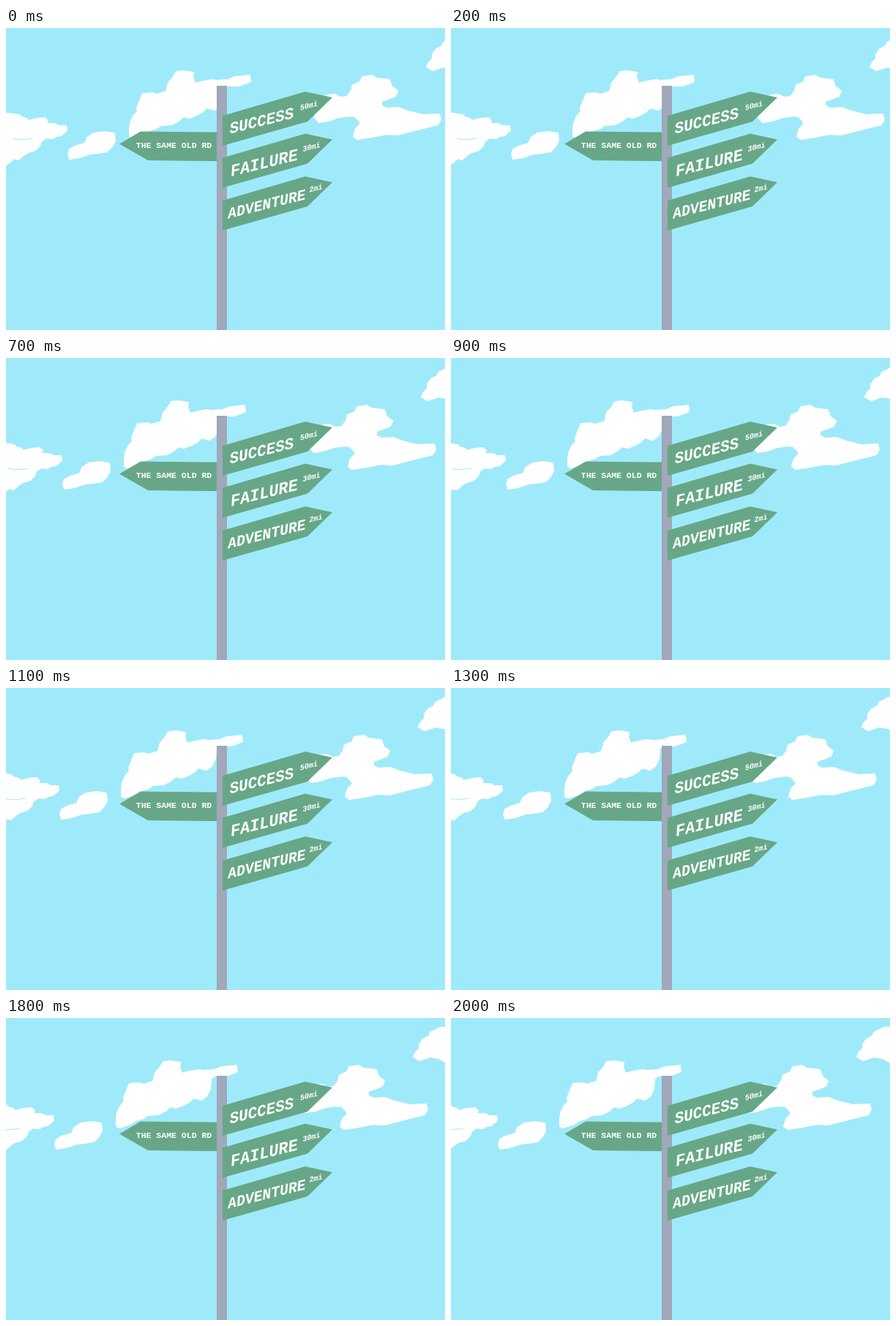
These frames come from a looping animation (600x413 px, 2100 ms). An HTML page:

```html
<!DOCTYPE html>
<html lang="en">
<head>
<meta charset="utf-8">
<title>Signpost</title>
<style>
  html, body { margin: 0; width: 100%; height: 100%; overflow: hidden; background: #9feafa; }
  svg { display: block; width: 600px; height: 413px; }
  text { font: bold 11.5px "Liberation Mono", "DejaVu Sans Mono", monospace; fill: #fff; text-anchor: middle; }
</style>
</head>
<body>
<svg viewBox="0 0 600 413">
  <rect width="600" height="413" fill="#9feafa"/>
  <g id="clouds" fill="#fff" stroke="#fff" stroke-width="2" stroke-linejoin="round">
    <path d="M-5 117 6 117 18 119 21 122 28 124 30 127 42 124 53 123 57 127 54 131 66 131 72 134 82 134 83 140 75 147 68 148 64 151 55 150 48 155 46 161 40 167 30 170 24 174 17 180 11 178 6 183 0 187 -5 188Z"/>
    <path d="M85 173 87 166 94 162 108 158 111 150 120 144 135 142 148 144 149 154 145 162 138 169 125 171 115 172 100 177 87 179Z"/>
    <path d="M169 148 169 138 170 130 174 121 180 114 179 109 183 99 187 90 200 89 206 91 219 87 222 75 229 67 233 60 243 59 256 61 255 67 257 72 258 76 270 73 282 71 288 72 303 71 313 67 333 65 334 73 327 76 318 79 303 79 298 83 297 97 292 107 285 112 274 109 268 115 261 119 250 123 243 121 236 127 226 132 212 133 206 137 196 140 188 145 173 150Z"/>
    <path d="M426 98 440 92 450 91 457 95 466 94 472 86 474 78 484 74 487 67 500 65 507 69 524 71 527 80 535 86 532 93 522 97 513 100 513 106 520 110 536 109 549 114 570 119 592 118 594 125 590 132 570 137 550 142 535 146 520 145 500 149 480 152 475 148 478 138 485 131 482 126 477 121 470 120 455 122 440 127 428 129 422 122Z"/>
    <path d="M575 53 578 47 583 42 583 36 588 29 596 25 598 20 604 17 611 13 624 13 624 61 618 60 610 55 598 53 583 58Z"/>
    <path d="M10 151 19 153 28 152 37 151" fill="none" stroke="#9feafa" stroke-width="1"/>
  </g>
  <path d="M288 79h14v334h-14z" fill="#a0a8b9"/>
  <path d="M155 158.500 184 141.500 288 142.500V182L194 181Z" fill="#67a787"/>
  <g id="signs" fill="#67a787"></g>
  <g id="labels"></g>
</svg>
<script>
const get = id => document.getElementById(id);

get("signs").innerHTML = [120, 177.5, 236].map(y =>
  `<path d="M296 ${y}l113-33 37 8-34 33-116 33z"/>`).join("");

// Each label is centred on x, y; tilted ones also lean to the right.
const label = (text, x, y, size, tilt = 14, lean = 18) =>
  `<text transform="translate(${x} ${y}) rotate(${-tilt}) skewX(${-lean})" y="${size * 0.33}" style="font-size:${size}px">${text}</text>`;

get("labels").innerHTML = [
  ["THE SAME OLD RD", 229.5, 160, 11.5, 0, 0],
  ["SUCCESS", 349.5, 126.5, 21.5],
  ["FAILURE", 353, 184, 22.5],
  ["ADVENTURE", 356.5, 240.5, 20.3],
  ["50mi", 414, 106, 10.4],
  ["30mi", 417.5, 162.5, 10.4],
  ["2mi", 423.5, 219, 10.4]
].map(args => label(...args)).join("");

// The clouds drift left one pixel every 100 ms.
function draw() {
  const step = Math.floor(performance.now() % 2100 / 100);
  get("clouds").setAttribute("transform", `translate(${-step} 0)`);
  requestAnimationFrame(draw);
}
draw();
</script>
</body>
</html>
```
